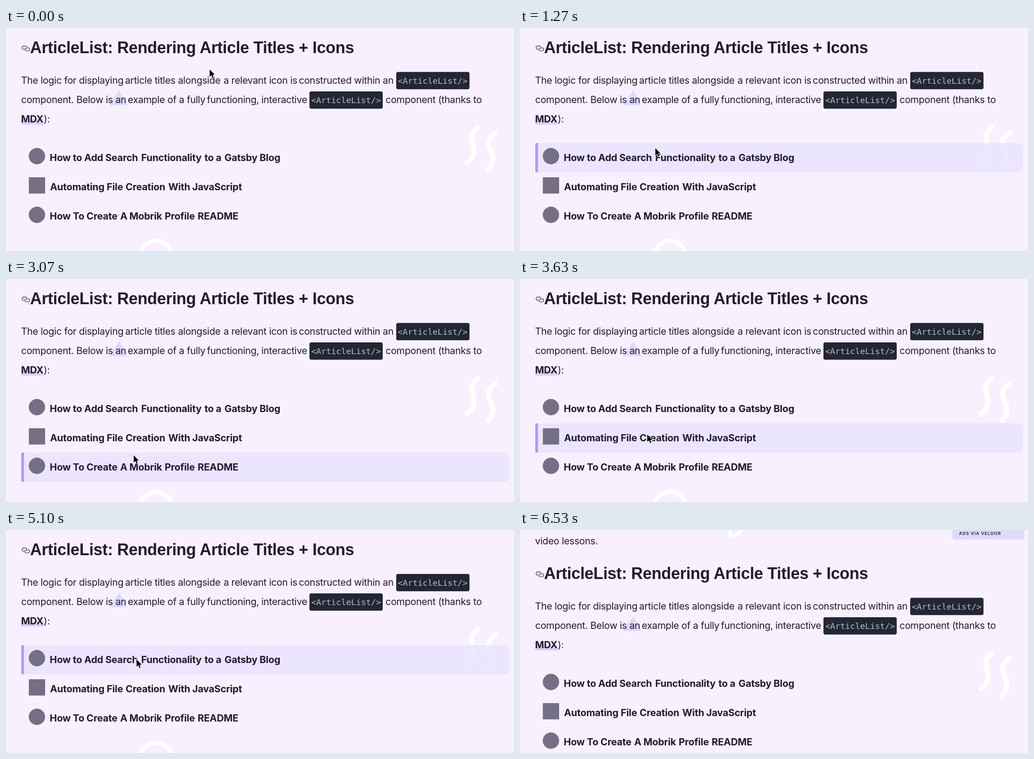
An HTML page for the animation above (6560 ms loop, 1130 by 496 pixels).

```html
<!DOCTYPE html>
<html lang="en">
<head>
<meta charset="utf-8">
<title>Article list</title>
<style>
  :root { --ink: #231b2e; --grey: #756f86; --loop: 6560ms infinite; }
  html, body { margin: 0; width: 100%; height: 100%; overflow: hidden; background: #f8f0fe; }
  svg { display: block; width: 1130px; height: 496px; }

  text { fill: var(--ink); font-optical-sizing: none; }
  .title { font: 700 36px "Liberation Sans", Arial, sans-serif; letter-spacing: -.009em; }
  .body { font: 400 21.3px Inter, sans-serif; letter-spacing: -.0145em; }
  .strong { font: 700 21.5px Inter, sans-serif; letter-spacing: -.01em; }
  .code { font: 400 18.4px "DejaVu Sans Mono", monospace; fill: #b9bac6; }
  .ad { font: 600 9.5px Inter, sans-serif; letter-spacing: 1px; }

  .doodle { fill: none; stroke: #fff; stroke-linecap: round; stroke-linejoin: round; }
  .link { fill: none; stroke: var(--ink); stroke-linecap: butt; }
  .icon { fill: var(--grey); }
  .chip { fill: #232635; }

  #page { animation: scroll var(--loop); }
  #bar { animation: hover var(--loop) step-end; }
  #cursor { animation: point var(--loop) linear, vanish var(--loop) step-end; }

  @keyframes scroll {
    0%, 90.7% { transform: translateY(0); animation-timing-function: ease-out; }
    95.58%, 100% { transform: translateY(53px); }
  }
  /* The bar sits on whichever row the pointer is over. */
  @keyframes hover {
    0% { opacity: 0; transform: translateY(0); }
    14.8% { opacity: 1; transform: translateY(0); }
    30.95% { opacity: 1; transform: translateY(65.2px); }
    41.77% { opacity: 1; transform: translateY(130.4px); }
    47.56% { opacity: 1; transform: translateY(65.2px); }
    59.76% { opacity: 1; transform: translateY(0); }
    79.65%, 100% { opacity: 0; transform: translateY(0); }
  }
  @keyframes point {
    0%, .91% { transform: translate(453px, 92px); }
    10.67% { transform: translate(345px, 216px); }
    14.48% { transform: translate(308px, 256px); }
    19.36% { transform: translate(301px, 267px); }
    21.8%, 24.39% { transform: translate(296px, 285px); }
    29.73% { transform: translate(289px, 319px); }
    35.06% { transform: translate(285px, 332px); }
    41.16% { transform: translate(284px, 384px); }
    43.45%, 44.66% { transform: translate(284px, 399px); }
    46.8% { transform: translate(284px, 392px); }
    53.81%, 55.34% { transform: translate(283px, 346px); }
    58.69% { transform: translate(282px, 323px); }
    62.04%, 75.76% { transform: translate(282px, 320px); }
    80.03% { transform: translate(300px, 251px); }
    85.37%, 100% { transform: translate(330px, 181px); }
  }
  @keyframes vanish {
    0% { opacity: 1; }
    85.37%, 100% { opacity: 0; }
  }
</style>
</head>
<body>
<svg viewBox="0 0 1130 496">
  <g id="page">
    <path d="M252 139.5L269 171L230 171.5Z" fill="#dcdafc" stroke="#dcdafc" stroke-linejoin="round"/>
    <g class="doodle">
      <path d="M1049 221C1030 236 1036 250 1040 264S1038 292 1025 300M1089 233C1070 246 1071 258 1077 270S1088 296 1073 315" stroke-width="11"/>
      <path d="M296 503C312 464 356 463 371 503" stroke-width="9"/>
      <path d="M467 -64L468 -38C479 -40 488 -46 496 -56" stroke-width="8"/>
    </g>

    <rect x="962" y="-130" width="160" height="98.5" rx="5" fill="#dddafc"/>
    <text class="ad" x="976.5" y="-42">ADS VIA VELDOR</text>
    <text class="body" x="33.5" y="-21.5">video lessons.</text>

    <g class="link" transform="translate(34 36) scale(1.2)">
      <path d="M5 9.5H4C2.7 9.5 1.5 8 1.5 6.5S2.8 3.5 4 3.5H8C9.2 3.5 10.5 5 10.5 6.5C10.5 7.6 9.9 8.7 9 9.2"/>
      <path d="M12 6.5H13C14.3 6.5 15.5 8 15.5 9.5S14.2 12.5 13 12.5H9C7.8 12.5 6.5 11 6.5 9.5C6.5 8.4 7.1 7.3 8 6.8"/>
    </g>
    <text class="title" x="53.5" y="56">ArticleList: Rendering Article Titles + Icons</text>

    <text class="body" y="123.7"><tspan x="33.5">The logic for displaying</tspan> <tspan x="265">article titles alongside</tspan> <tspan x="484">a relevant icon is</tspan> <tspan x="651.3">constructed within an</tspan></text>
    <rect class="chip" x="868" y="97.7" width="163" height="38.6" rx="4"/>
    <text class="code" x="871.5" y="123.5">&lt;ArticleList/&gt;</text>

    <text class="body" y="167"><tspan x="33.8">component. Below is an</tspan> <tspan x="270.8">example of a fully</tspan> <tspan x="447">functioning,</tspan> <tspan x="568">interactive</tspan> <tspan x="844.3">component (thanks to</tspan></text>
    <rect class="chip" x="675" y="141" width="163" height="38.6" rx="4"/>
    <text class="code" x="679" y="166.8">&lt;ArticleList/&gt;</text>

    <rect x="34" y="203" width="49.5" height="12" fill="#dbd0fa"/>
    <text class="strong" x="33.5" y="210.3">MDX</text>
    <text class="body" x="84" y="210.3">):</text>

    <g id="bar">
      <path d="M34 256H1107a12 12 0 0 1 12 12V309a12 12 0 0 1 -12 12H34Z" fill="rgba(232,227,254,.8)"/>
      <path d="M40 256V321H37a3 3 0 0 1 -3 -3V259a3 3 0 0 1 3 -3Z" fill="#a99bfd"/>
    </g>

    <g class="icon">
      <circle cx="68.8" cy="285" r="18.2"/>
      <rect x="50.8" y="332" width="36.2" height="36.2"/>
      <circle cx="68.8" cy="415.5" r="18.2"/>
    </g>
    <g class="strong">
      <text y="295.7"><tspan x="97.3">How to Add Search</tspan> <tspan x="300.8">Functionality</tspan> <tspan x="441.5">to a</tspan> <tspan x="486">Gatsby Blog</tspan></text>
      <text y="361"><tspan x="98">Automating</tspan> <tspan x="224">File</tspan> <tspan x="266">Creation</tspan> <tspan x="361">With</tspan> <tspan x="414.3">JavaScript</tspan></text>
      <text y="426.2"><tspan x="97.3">How To Create</tspan> <tspan x="254">A</tspan> <tspan x="274.5">Mobrik</tspan> <tspan x="353">Profile</tspan> <tspan x="426.3">README</tspan></text>
    </g>
  </g>

  <path id="cursor" d="M0 0V16.5L3.8 13L6.4 19L9 18L6.5 12H11.5Z" fill="#000" stroke="#fff" stroke-width="2" paint-order="stroke"/>
</svg>
</body>
</html>
```
